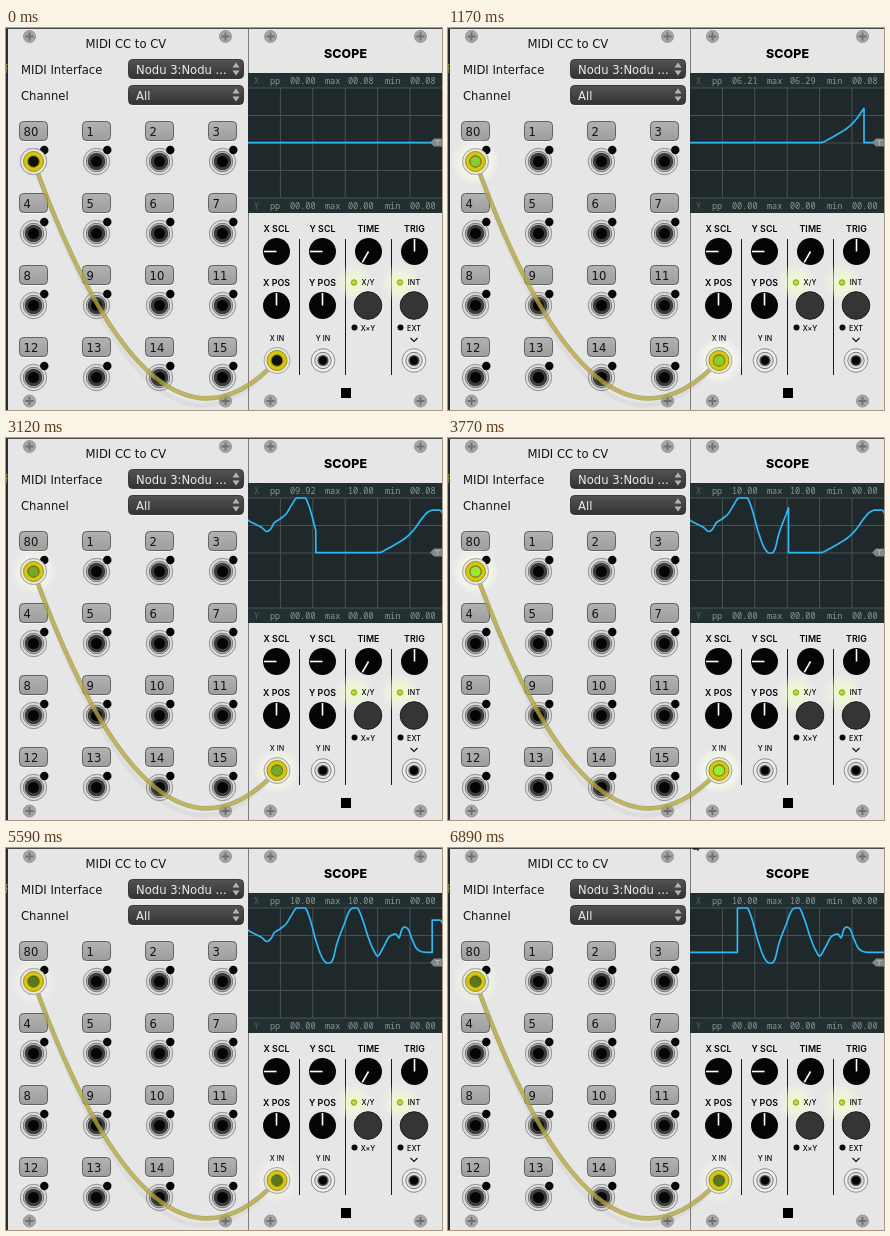
An HTML page that plays this animation: 436 px wide and 382 px high, repeating every 7020 ms.

```html
<!DOCTYPE html>
<html lang="en">
<head>
<meta charset="utf-8">
<title>MIDI to scope</title>
<style>
  html, body { margin: 0; width: 100%; height: 100%; overflow: hidden; background: #e6e6e6; }
  svg { display: block; width: 436px; height: 382px; }
  .ui { font: 11.6px "DejaVu Sans", sans-serif; fill: #141414; }
  .menu { fill: #ececec; }
  .label { font: 600 8.8px Inter, sans-serif; fill: #000; text-anchor: middle; letter-spacing: .1px; }
  .small { font-size: 7.2px; font-weight: 500; }
  .title { font-size: 12.4px; font-weight: 800; }
  .stat { font: 8.5px "Noto Sans Mono", monospace; fill: #8b9898; white-space: pre; }
  .dim { fill: #566364; }
</style>
</head>
<body>
<svg id="stage" viewBox="0 0 436 382" xmlns="http://www.w3.org/2000/svg">
  <defs>
    <linearGradient id="menuFill" x2="0" y2="1">
      <stop stop-color="#535353"/><stop offset="1" stop-color="#333"/>
    </linearGradient>
    <linearGradient id="keyFill" x2="0" y2="1">
      <stop stop-color="#b2b2b2"/><stop offset="1" stop-color="#9e9e9e"/>
    </linearGradient>
    <radialGradient id="ledGlow">
      <stop stop-color="#f0ffb4" stop-opacity=".85"/>
      <stop offset=".5" stop-color="#f6ffd2" stop-opacity=".5"/>
      <stop offset="1" stop-color="#faffe6" stop-opacity="0"/>
    </radialGradient>
    <radialGradient id="plugGlow">
      <stop stop-color="#f6ffc8" stop-opacity=".9"/>
      <stop offset=".55" stop-color="#fbffe4" stop-opacity=".75"/>
      <stop offset="1" stop-color="#fff" stop-opacity="0"/>
    </radialGradient>
    <g id="screw">
      <circle r="6" fill="#a6a6a6" stroke="#949494"/>
      <path d="M-4 0H4M0-4V4" stroke="#707070" stroke-width="1.8"/>
    </g>
    <g id="jack">
      <circle r="13.2" fill="#dcdcdc" stroke="#909090"/>
      <circle r="10.2" fill="#bdbdbd" stroke="#707070"/>
      <circle r="8.800" fill="#3c3c3c"/>
      <circle r="5.5" fill="#050505"/>
    </g>
    <g id="port">
      <circle r="11.8" fill="#eee" stroke="#8c8c8c"/>
      <circle r="8.2" fill="#dedede" stroke="#777"/>
      <circle r="5.6" fill="#555"/>
      <circle r="4.2" fill="#050505"/>
    </g>
    <g id="plug">
      <circle r="13" fill="#e8e8e4" stroke="#a6a69c"/>
      <circle r="10" fill="#d6c60e" stroke="#9c9010"/>
      <circle r="5.800" fill="#11110a" stroke="#8b7f10"/>
    </g>
  </defs>
  <g id="panel"></g>
  <g id="screen"></g>
  <path id="trace" fill="none" stroke="#30b8f4" stroke-width="1.7" stroke-linejoin="round"/>
  <g id="marker">
    <path d="M424 114.500L428 110.500H436V118.500H428Z" fill="#7d898b"/>
    <path d="M429 112.500H434M431.500 112.500V117" stroke="#a9b3b4" fill="none"/>
  </g>
  <g id="wires"></g>
  <path id="pointer" d="M244 0H252L250 3L248.500 1.500L246 2Z" fill="#222"/>
</svg>
<script>
const $ = id => document.getElementById(id);

function add(parent, tag, attrs, text) {
  const el = document.createElementNS('http://www.w3.org/2000/svg', tag);
  for (const key in attrs) el.setAttribute(key, attrs[key]);
  if (text !== undefined) el.textContent = text;
  parent.append(el);
  return el;
}
const panel = $('panel'), screen = $('screen'), wires = $('wires');
const rect = (x, y, width, height, fill, more, to = panel) =>
  add(to, 'rect', { x, y, width, height, fill, ...more });
const dot = (cx, cy, r, fill, more, to = panel) =>
  add(to, 'circle', { cx, cy, r, fill, ...more });
const line = (d, stroke, width = 1, to = panel) =>
  add(to, 'path', { d, stroke, 'stroke-width': width, fill: 'none' });
const text = (x, y, cls, str, to = panel) => add(to, 'text', { x, y, class: cls }, str);
const use = (id, x, y, to = panel) =>
  add(to, 'use', { href: '#' + id, transform: `translate(${x} ${y})` });

// Panels
rect(0, 0, 436, 382, '#e6e6e6');
rect(0, 0, 2, 382, '#2b2b2b');
line('M0 36.500H2M0 40.500H2M.5 36V45', '#7c7440');
line('M242.5 0V382', '#7c7c7c');
line('M0 .5H436', '#4a4a4a');
for (const x of [23.5, 219.5, 264.5, 414.5])
  for (const y of [8.5, 373]) use('screw', x, y);

// Rounded control with a light bevel under its lower edge
function control(x, y, width, height, fill, stroke) {
  rect(x + .5, y + 1.5, width, height, 'none', { rx: 4, stroke: '#f4f4f4' });
  rect(x + .5, y + .5, width, height, fill, { rx: 4, stroke });
}

// MIDI module
text(79.5, 20, 'ui', 'MIDI CC to CV');
[['MIDI Interface', 'Nodu 3:Nodu ...'], ['Channel', 'All']].forEach(([name, value], i) => {
  const y = 31 + 26 * i;
  text(15, y + 14.5, 'ui', name);
  control(122, y, 115, 19, 'url(#menuFill)', '#3a3a3a');
  text(130, y + 14.5, 'ui menu', value);
  add(panel, 'path', { fill: '#b5b5b5',
    d: `M226.500 ${y + 8.5}L230 ${y + 3.5}L233.500 ${y + 8.5}ZM226.500 ${y + 11.5}L230 ${y + 16.5}L233.500 ${y + 11.5}Z` });
});

// Socket lights lie above the plug glow, so they go on the wire layer later
const sockets = [];
for (let i = 0; i < 16; i++) {
  const x = 13 + 63 * (i % 4), y = 94 + 72 * (i >> 2);
  control(x, y - 1, 28, 19, 'url(#keyFill)', '#626262');
  text(x + 4.5, y + 13.5, 'ui', i ? i : 80);
  use('jack', x + 14.5, y + 39.5);
  sockets.push([x + 25.3, y + 28]);
}

// Scope module
text(339.5, 29.8, 'label title', 'SCOPE');
for (const x of [293.5, 339.5, 385.5]) line(`M${x} 211V347`, '#1a1a1a');

function knob(x, y, angle, name) {
  text(x, y - 20, 'label', name);
  dot(x, y, 13.5, '#050505');
  add(panel, 'path', { d: `M${x} ${y}v-12.500`, stroke: '#fff', 'stroke-width': 1.6,
    transform: `rotate(${angle} ${x} ${y})` });
}
knob(270.5, 223.5, -90, 'X SCL');
knob(316.5, 223.5, -90, 'Y SCL');
knob(362.5, 223.5, -150, 'TIME');
knob(408.5, 223.5, 0, 'TRIG');
knob(270.5, 277.5, 0, 'X POS');
knob(316.5, 277.5, 0, 'Y POS');

[[362, 'X/Y', 'X×Y'], [408, 'INT', 'EXT']].forEach(([x, on, off]) => {
  dot(x - 14, 254.5, 20, 'url(#ledGlow)');
  dot(x, 277.5, 13.8, '#353535', { stroke: '#1c1c1c' });
  dot(x - 14, 254.5, 2.7, '#b6e038', { stroke: '#7fa020' });
  text(x, 257, 'label small', on);
  dot(x - 13.5, 299.5, 3, '#0a0a0a');
  text(x, 302.5, 'label small', off);
});
text(271, 313, 'label small', 'X IN');
text(317, 313, 'label small', 'Y IN');
line('M404.500 310L408 313.500L411.500 310', '#111', 1.2);
use('port', 317, 332.5);
use('port', 408, 332.5);
rect(335, 360, 10, 10, '#000');

// Scope screen
rect(242, 45, 194, 140, '#1f292b', {}, screen);
rect(242, 45, 194, 15, '#233031', {}, screen);
rect(242, 170, 194, 15, '#233031', {}, screen);
for (let i = 1; i < 6; i++) line(`M${242 + 32.4 * i} 60V170`, '#485355', 1, screen);
for (let i = 0; i < 5; i++) line(`M242 ${60 + 27.5 * i}H436`, '#485355', 1, screen);

function statRow(name, y) {
  text(248, y, 'stat dim', name, screen);
  [[264, 'pp'], [319, 'max'], [379, 'min']].forEach(([x, s]) => text(x, y, 'stat', s, screen));
  return [284, 342, 404].map(x => text(x, y, 'stat', '00.00', screen));
}
const stats = statRow('X', 56);
statRow('Y', 181);

// Cable, plugs and their lights
const ends = [[27.5, 133.5], [271, 332.5]];
const glows = ends.map(([x, y]) => dot(x, y, 24, 'url(#plugGlow)', {}, wires));
sockets.forEach(([x, y]) => dot(x, y, 4.2, '#060606', {}, wires));

const cable = sag => `M27.500 133.500Q148 ${sag} 271 332.500`;
line(cable(482), 'rgba(0,0,0,.04)', 4.6, wires);
const cord = add(wires, 'g', { opacity: .78 });
line(cable(465), '#a1973a', 4.6, cord);
line(cable(465), '#b4a846', 3, cord);

const cores = ends.map(([x, y]) => {
  use('plug', x, y, wires);
  return dot(x, y, 5.3, '#aaff38', {}, wires);
});

// Signal: screen heights along an unrolled sweep axis
const LEFT = 242, SWEEP = 198, ZERO = 115, VOLT = 5.5, REST = 114.56;
const keys = [
  [373, REST], [381, 111], [390, 106], [400, 99.5], [408, 91.5], [416, 80.4],
  [422, 74], [427, 72.1], [434, 72.1], [440, 82], [448, 86.5], [453, 89], [459, 93.5],
  [463, 90.5], [466, 85], [472, 81], [478, 76], [483, 68], [489, 60], [497, 60], [501, 68],
  [504, 78], [508, 93], [515, 111], [519, 115], [522, 115], [525, 111], [528.5, 97], [535.5, 78],
  [543, 61], [546, 60], [549, 60], [554, 70], [560.5, 90], [566, 103], [569.5, 108], [575.5, 99],
  [582, 88], [588, 86], [591, 90], [594, 81], [596.5, 79], [600, 81], [604, 91], [609, 101],
  [615, 104], [620, 104.4]
];
const grade = i => (keys[i + 1][1] - keys[i][1]) / (keys[i + 1][0] - keys[i][0]);
const slope = i => {
  if (i === 0 || i === keys.length - 1) return 0;
  const a = grade(i - 1), b = grade(i);
  return a * b > 0 ? 2 * a * b / (a + b) : 0;
};
// Monotone cubic through the keys
function signal(u) {
  if (u < keys[0][0]) return REST;
  const i = keys.findIndex(k => k[0] > u) - 1;
  if (i < 0) return keys[keys.length - 1][1];
  const [x0, y0] = keys[i], [x1, y1] = keys[i + 1];
  const w = x1 - x0, p = (u - x0) / w, q = 1 - p;
  return q * q * (1 + 2 * p) * y0 + p * p * (3 - 2 * p) * y1
    + p * q * w * (q * slope(i) - p * slope(i + 1));
}
const volts = y => Math.max(0, Math.min(10, (ZERO - y) / VOLT));

const LOOP = 7020, STEP = 130, HOLD = 390, SPEED = .0471;

function draw(ms) {
  const t = ms < HOLD ? 0 : Math.floor(ms / STEP) * STEP;
  const head = 416 + (t - 1170) * SPEED;
  const turn = Math.floor((head - LEFT) / SWEEP) * SWEEP;
  const edge = head - turn;
  const at = x => signal(x + turn - (x > edge ? SWEEP : 0));

  const points = [], heights = [];
  const plot = (x, y) => { points.push(x.toFixed(1) + ' ' + y.toFixed(2)); heights.push(y); };
  for (let x = LEFT; x <= 440; x++) {
    if (x > edge && x - 1 <= edge) {
      plot(edge, at(edge));
      plot(edge, at(edge + .01));
    }
    plot(x, at(x));
  }
  $('trace').setAttribute('d', 'M' + points.join('L'));

  const max = volts(Math.min(...heights)), min = volts(Math.max(...heights));
  [max - min, max, min].forEach((v, i) => {
    stats[i].textContent = v.toFixed(2).padStart(5, '0');
  });

  const level = t ? Math.sqrt(volts(signal(head)) / 10) : 0;
  cores.forEach(core => core.setAttribute('opacity', level));
  glows.forEach(glow => glow.setAttribute('opacity', Math.min(1, level * 1.2)));
  $('pointer').setAttribute('visibility', t >= 6240 ? 'visible' : 'hidden');
}

const start = performance.now();
function tick() {
  draw((performance.now() - start) % LOOP);
  requestAnimationFrame(tick);
}
tick();
</script>
</body>
</html>
```
